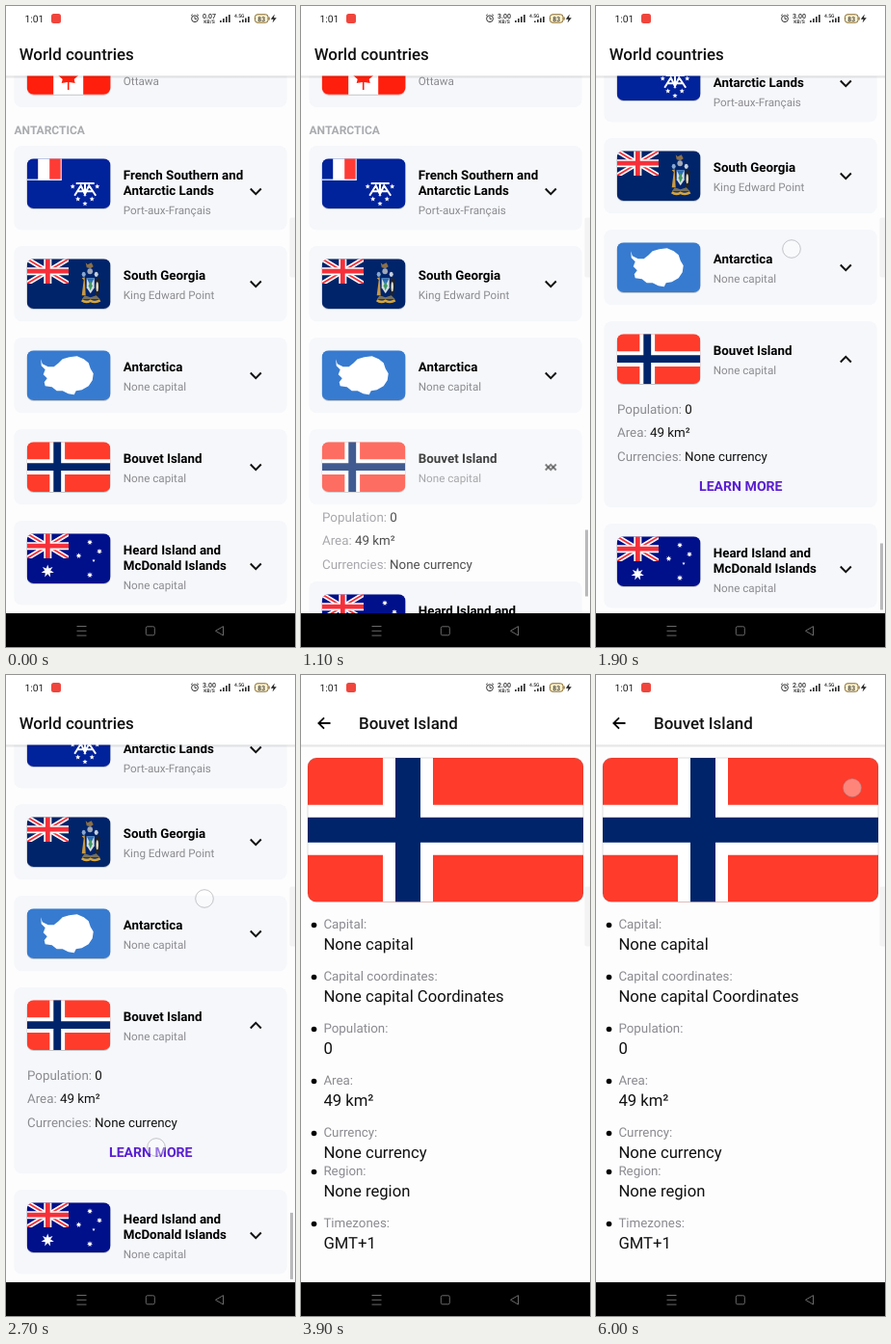
An HTML page for the animation above (6100 ms loop, 300 by 665 pixels).

```html
<!DOCTYPE html>
<html lang="en">
<head>
<meta charset="utf-8">
<title>World countries</title>
<style>
  html, body { margin: 0; width: 100%; height: 100%; overflow: hidden; background: #fdfdfe; }
  svg { display: block; }
  text { font-family: Roboto, sans-serif; white-space: pre; text-rendering: geometricPrecision; }
</style>
</head>
<body>
<svg id="stage" width="300" height="665" viewBox="0 0 300 665"></svg>
<script>
const LOOP = 6100, STEP = 100;
const GREY = '#8b8b90', CARD = '#f5f7fa';

// ---- drawing helpers ----
const text = (x, y, size, str, fill = '#000', weight = 400, more = '') =>
  `<text x="${x}" y="${y}" font-size="${size}" fill="${fill}" font-weight="${weight}" ${more}>${str}</text>`;
const rect = (x, y, w, h, fill, more = '') =>
  `<rect x="${x}" y="${y}" width="${w}" height="${h}" fill="${fill}" ${more}/>`;
const line = (d, stroke, width, more = '') =>
  `<path d="${d}" fill="none" stroke="${stroke}" stroke-width="${width}" ${more}/>`;
const shape = (d, fill) => `<path d="${d}" fill="${fill}"/>`;
const move = (x, y, inner, more = '') => `<g transform="translate(${x} ${y})" ${more}>${inner}</g>`;
const oval = (x, y, rx, ry, fill) => `<ellipse cx="${x}" cy="${y}" rx="${rx}" ry="${ry}" fill="${fill}"/>`;

function star(cx, cy, r, points = 7) {
  let d = '';
  for (let i = 0; i < points * 2; i++) {
    const a = i * Math.PI / points - Math.PI / 2, q = i % 2 ? r * .45 : r;
    d += `${i ? 'L' : 'M'}${(cx + q * Math.cos(a)).toFixed(2)} ${(cy + q * Math.sin(a)).toFixed(2)}`;
  }
  return shape(d + 'Z', '#fff');
}

// ---- flags, 86.7 x 51.7 ----
const union = `<svg width="43.3" height="25.8">` +
  line('M0 0L43.3 25.8M43.3 0L0 25.8', '#fff', 5) +
  line('M0 0L43.3 25.8M43.3 0L0 25.8', '#f5303a', 1.8) +
  line('M21.6 0V26M0 12.9H43.3', '#fff', 8) +
  line('M21.6 0V26M0 12.9H43.3', '#f5303a', 4.8) + '</svg>';

const norse = (w, h) => `<svg width="${w}" height="${h}" viewBox="0 0 22 16" preserveAspectRatio="xMidYMid slice">` +
  rect(0, 0, 22, 16, '#ff3b2b') + line('M8 0V16M0 8H22', '#fff', 4) +
  line('M8 0V16M0 8H22', '#00246a', 2) + '</svg>';

const flags = {
  canada: rect(0, 0, 87, 52, '#fff') + rect(0, 0, 27.5, 52, '#ff1f0c') + rect(58.5, 0, 29, 52, '#ff1f0c') +
    shape('M43 6L46 12L49 10L48 20L53 16L54 20L59 19L56 25L58 28L49 36L50 40L43.8 39V47H42.2V39L36 40L37 36L28 28L30 25L28 19L33 20L34 16L39 20L38 10L41 12Z', '#ff1f0c'),
  southern: rect(0, 0, 87, 52, '#00229b') + rect(11.5, 0, 24.5, 22.5, '#fff') + rect(0, 21.3, 36, 1.2, '#fff') +
    rect(23.5, 0, 11.5, 21.3, '#ff3b36') +
    line('M51 25.8H70M60.3 25.8V39M49.5 38.5L56 28L61 38.5M52 34H69M59.5 38.5L64.5 28L71.5 38.5', '#fff', 2) +
    [[47.5, 29], [73, 29], [53, 42], [67.5, 42], [60.3, 46.8]].map(([x, y]) => star(x, y, 2.7, 5)).join(''),
  georgia: rect(0, 0, 87, 52, '#00246a') + union +
    shape('M62 9L61 4L63 6L67 4L69 8L66 10Z', '#8b7048') + oval(65.5, 13, 2.8, 3, '#9fa8b8') +
    oval(59, 16, 2, 2.6, '#88a8cf') + oval(72, 16, 2, 2.6, '#c6d0dc') +
    shape('M57 38L59 22L57 20L60 19L61 38Z', '#c99a45') +
    shape('M71 38L71 23L74 19L76 22L75 37Z', '#20242c') + oval(73, 29, 1.2, 5, '#e6e2d0') +
    shape('M62 20H70V30L66 36L62 30Z', '#d4dbe0') + shape('M62 20H70L66 28Z', '#2d6fb4') +
    shape('M64 28L66 23L68 28L66 33Z', '#3f9a63') +
    shape('M57 42L60 38L66 40L72 38L76 42Z', '#77715f') +
    line('M57 43Q61 46 66 43.5Q71 46 76 43', '#d9a637', 2.6),
  antarctica: rect(0, 0, 87, 52, '#377bd0') +
    shape('M14.5 9L16 14L22 17L28 17L33 13L37 9L44 7L52 6L59 9L64 13L66 19L69 24L68 31L64 37L57 41L51 42L49 46L43 45L37 42L31 42L26 38L19 37L18 33L21 29L17 25L19 20L15 16Z', '#fff'),
  bouvet: norse(86.7, 51.7),
  heard: rect(0, 0, 87, 52, '#00108a') + union + star(21.5, 39, 6.8) +
    [[65.3, 9, 3], [53.8, 23, 3], [75.3, 18.5, 3], [65.3, 43, 3.2]].map(s => star(...s)).join('') + star(69.3, 28, 1.8, 5)
};

// ---- list ----
const chevron = (y, up) => line(up ? `M253.8 ${y + 3}L259.3 ${y - 2.6}L264.8 ${y + 3}` : `M253.8 ${y - 3}L259.3 ${y + 2.6}L264.8 ${y - 3}`, '#111', 2);

function row(flag, lines, capital) {
  const extra = lines.length > 1 ? 16 : 0;
  return move(21.7, 13.3, rect(0, 1, 86.7, 51.7, '#000', 'rx="7" opacity=".2"') +
      `<g clip-path="url(#flagClip)">${flags[flag]}</g>`) +
    lines.map((s, i) => text(121.8, 35 + i * 16, 13.33, s, '#000', 700)).join('') +
    text(121.8, 55.2 + extra, 11.67, capital, GREY);
}
const card = (y, h, flag, lines, capital) => move(0, y,
  rect(8.3, 0, 283.4, h, CARD, 'rx="8"') + row(flag, lines, capital) + chevron(39.5 + (h > 80 ? 8 : 0)));

const pair = (y, label, value) => text(22, y, 13.33, `${label}: <tspan fill="#111">${value}</tspan>`, GREY);

const list = `<g id="list">` +
  move(0, 26.7, rect(8.3, 0, 283.4, 78.3, CARD, 'rx="8"') + row('canada', [], 'Ottawa')) +
  text(8.5, 133, 12, 'ANTARCTICA', '#a9abae', 700) +
  card(145, 87.5, 'southern', ['French Southern and', 'Antarctic Lands'], 'Port-aux-Français') +
  card(249, 78.3, 'georgia', ['South Georgia'], 'King Edward Point') +
  card(344, 78.3, 'antarctica', ['Antarctica'], 'None capital') +
  move(0, 439,
    rect(8.3, 0, 283.4, 78.3, CARD, 'rx="8" id="openCard"') +
    row('bouvet', ['Bouvet Island'], 'None capital') +
    `<g id="down">${chevron(39.5)}</g><g id="up">${chevron(39.5, true)}</g>` +
    `<g clip-path="url(#openClip)">` + pair(95.5, 'Population', '0') + pair(120.3, 'Area', '49 km²') +
    pair(145, 'Currencies', 'None currency') + text(150.3, 175.5, 14.1, 'LEARN MORE', '#5a1fd1', 700, 'text-anchor="middle"') + '</g>',
    'id="open"') +
  `<g id="last">${card(534, 87.5, 'heard', ['Heard Island and', 'McDonald Islands'], 'None capital')}</g></g>`;

// ---- headers and detail pages ----
const header = (x, title) => rect(0, 0, 300, 72.5, '#fff') + rect(0, 72.5, 300, 3, 'url(#shade)') +
  text(x, 56.3, 16.9, title, '#111', 500);

const labels = ['Capital', 'Capital coordinates', 'Population', 'Area', 'Currency', 'Region', 'Timezones'];
function page(id, title, picture, values) {
  const facts = labels.map((label, i) => {
    const y = 258.5 + i * 54 - (i > 4 ? 14 : 0);
    return `<circle cx="13.5" cy="${y + 1}" r="2.8"/>` + text(23.4, y + 4.6, 13.33, label + ':', GREY) +
      text(23.4, y + 26.6, 16.67, values[i], '#111');
  }).join('');
  return `<g id="${id}">` + rect(0, 0, 300, 630, '#fdfdfe') + header(60, title) +
    line('M30.5 50H18.5M24 44.3L18.3 50L24 55.7', '#000', 1.8) +
    move(7, 86, `<g clip-path="url(#heroClip)">${picture}</g>` +
      rect(0, 0, 286, 149.5, 'none', 'rx="9" stroke="#000" stroke-opacity=".13"')) + facts + '</g>';
}
const clock = rect(0, 0, 286, 150, '#fff') +
  '<circle cx="143" cy="74.5" r="107.5" fill="none" stroke="#929094" stroke-width="24"/>' +
  shape('M130.5 15H149V77L203 109.5L194 124L130.5 86.5Z', '#929094');

const signal = (x, height) => [.25, .5, .75, 1].map((k, i) => rect(x + i * 3, 17 - k * height, 1.7, k * height, '#333')).join('');

const status = rect(0, 0, 300, 28, '#fff') + text(19.5, 16.8, 10.3, '1:01', '#222') +
  rect(47, 8, 10, 10, '#f0453c', 'rx="2.5"') +
  '<circle cx="196" cy="13.2" r="3.4" fill="none" stroke="#333"/>' +
  line('M196 11V13.4H198M192 10.2L193.8 8.6M200 10.2L198.2 8.6', '#333', .9) +
  text(211, 13.2, 7, '', '#222', 500, 'text-anchor="middle" id="speed"') +
  text(211, 18.3, 5, 'KB/S', '#222', 500, 'text-anchor="middle"') +
  signal(222, 8) + signal(242, 6) +
  text(237, 12.2, 5, '4.5G', '#222', 500) +
  rect(258.5, 8.8, 13.5, 8.4, '#fff4cf', 'rx="2.5" stroke="#87672b"') + rect(272.5, 11.5, 1.2, 3, '#87672b') +
  text(265.2, 15.6, 6.8, '83', '#333', 500, 'text-anchor="middle"') +
  shape('M278.8 8.5L274.8 13.7H277.6L276.6 17.5L280.8 12.2H278Z', '#222');

const navBar = rect(0, 630, 300, 35, '#000') +
  line('M73.5 643.5H83.5M73.5 648.3H83.5M73.5 653.1H83.5', '#6a6a6a', 1) +
  rect(145.3, 643.8, 9, 9, 'none', 'rx="1.5" stroke="#6a6a6a"') +
  line('M217.5 648.3L225.5 643.6V653Z', '#6a6a6a', 1);

const dot = id => `<circle id="${id}" r="9.3" fill="#fff" fill-opacity=".38" stroke="#98989f" stroke-opacity=".55"/>`;

const stage = document.getElementById('stage');
stage.innerHTML = `<defs>
  <clipPath id="flagClip"><rect width="86.7" height="51.7" rx="7"/></clipPath>
  <clipPath id="heroClip"><rect width="286" height="149.5" rx="9"/></clipPath>
  <clipPath id="openClip"><rect id="openArea" width="300" height="78.3"/></clipPath>
  <linearGradient id="shade" x2="0" y2="1"><stop stop-opacity=".13"/><stop offset="1" stop-opacity="0"/></linearGradient>
  </defs>` + rect(0, 0, 300, 665, '#fdfdfe') + list + rect(295, 543, 3, 69, '#b9b9bb', 'id="bar"') +
  `<g id="listHead">${header(13.7, 'World countries')}</g>` +
  page('loading', 'World countries', clock, ['None', 'None', 'None', 'none', 'none', 'none', 'none']) +
  page('loaded', 'Bouvet Island', norse(286, 149.5),
    ['None capital', 'None capital Coordinates', '0', '49 km²', 'None currency', 'None region', 'GMT+1']) +
  line('', '#dcc331', 7, 'id="spinner"') +
  rect(294.5, 219.5, 8, 62, '#f3f3f4', 'rx="2"') + status + navBar + dot('finger') + dot('tap');

// ---- motion ----
const $ = id => document.getElementById(id);
const set = (id, attrs) => { for (const k in attrs) $(id).setAttribute(k, attrs[k]); };
const show = (id, on) => set(id, { display: on ? 'inline' : 'none' });

// Values at key times, linear between them; null outside the range.
function along(keys, t) {
  for (let i = 0; i < keys.length - 1; i++) {
    const [a, ...p] = keys[i], [b, ...q] = keys[i + 1];
    if (t >= a && t <= b) return p.map((v, j) => v + (q[j] - v) * (t - a) / (b - a));
  }
  return null;
}

const growth = [[0, 0], [900, 0], [1000, 24], [1100, 63], [1200, 100], [1300, 115], [LOOP, 115]];
const scrolling = [[0, 0], [1500, 0], [1600, 42], [1700, 90], [1800, 109], [2000, 115], [LOOP, 115]];
const pressed = [[0, 1], [800, 1], [900, .8], [1000, .65], [1100, .74], [1200, .9], [1300, 1], [LOOP, 1]];
const gestures = [
  [[1600, 183, 413], [1700, 189, 363], [1800, 197, 295], [1900, 203, 252], [2000, 206, 232], [2800, 206, 232]],
  [[4500, 226, 414], [4600, 234, 335]],
  [[4900, 222, 416], [5000, 228, 370], [5200, 246, 240]],
  [[5500, 60, 220], [5700, 150, 165], [5900, 250, 120], [6000, 266, 117]]
];

function placeDot(id, at) {
  show(id, at);
  if (at) set(id, { cx: at[0], cy: at[1] });
}

function spin(t) {
  const from = 72 + (t - 3200) * .3, sweep = 73 + 90 * (1 - Math.cos((t - 3200) / 1333 * 2 * Math.PI));
  const at = deg => {
    const a = deg * Math.PI / 180;
    return `${150 + 16.5 * Math.cos(a)} ${301 + 16.5 * Math.sin(a)}`;
  };
  return `M${at(from)}A16.5 16.5 0 ${sweep > 180 ? 1 : 0} 1 ${at(from + sweep)}`;
}

function draw(t) {
  const [grown] = along(growth, t), [scroll] = along(scrolling, t), [fade] = along(pressed, t);
  const turning = grown > 0 && grown < 115;
  set('list', { transform: `translate(0 ${-scroll})` });
  set('last', { transform: `translate(0 ${grown})` });
  set('open', { opacity: fade });
  set('openCard', { height: grown === 115 ? 193.3 : 78.3 });
  set('openArea', { height: grown > 0 ? 95 + grown : 78.3 });
  show('down', grown < 115);
  show('up', grown > 0);
  set('up', { opacity: turning ? .7 : 1 });
  set('down', { opacity: turning ? .7 : 1 });
  show('bar', t >= 1000 && t < 2900);
  set('bar', { y: 543.5 + scroll * .125 });

  const enter = Math.min(1, Math.max(0, (t - 2800) / 300)), zoom = .9 + .1 * enter;
  show('loading', enter > 0 && t < 3900);
  set('loading', { opacity: enter, transform: `translate(${150 * (1 - zoom)} ${351 * (1 - zoom)}) scale(${zoom})` });
  show('loaded', t >= 3900);
  show('spinner', t >= 3100 && t < 3900);
  set('spinner', { d: spin(t) });

  placeDot('finger', gestures.reduce((found, g) => found || along(g, t), null));
  placeDot('tap', t >= 2600 && t <= 2800 ? [156, 490] : null);
  $('speed').textContent = t < 300 ? '0.07' : t < 3600 ? '3.00' : '2.00';
}

const start = performance.now();
(function tick() {
  const t = (performance.now() - start) % LOOP;
  draw(Math.floor(t / STEP) * STEP);
  requestAnimationFrame(tick);
})();
</script>
</body>
</html>
```
